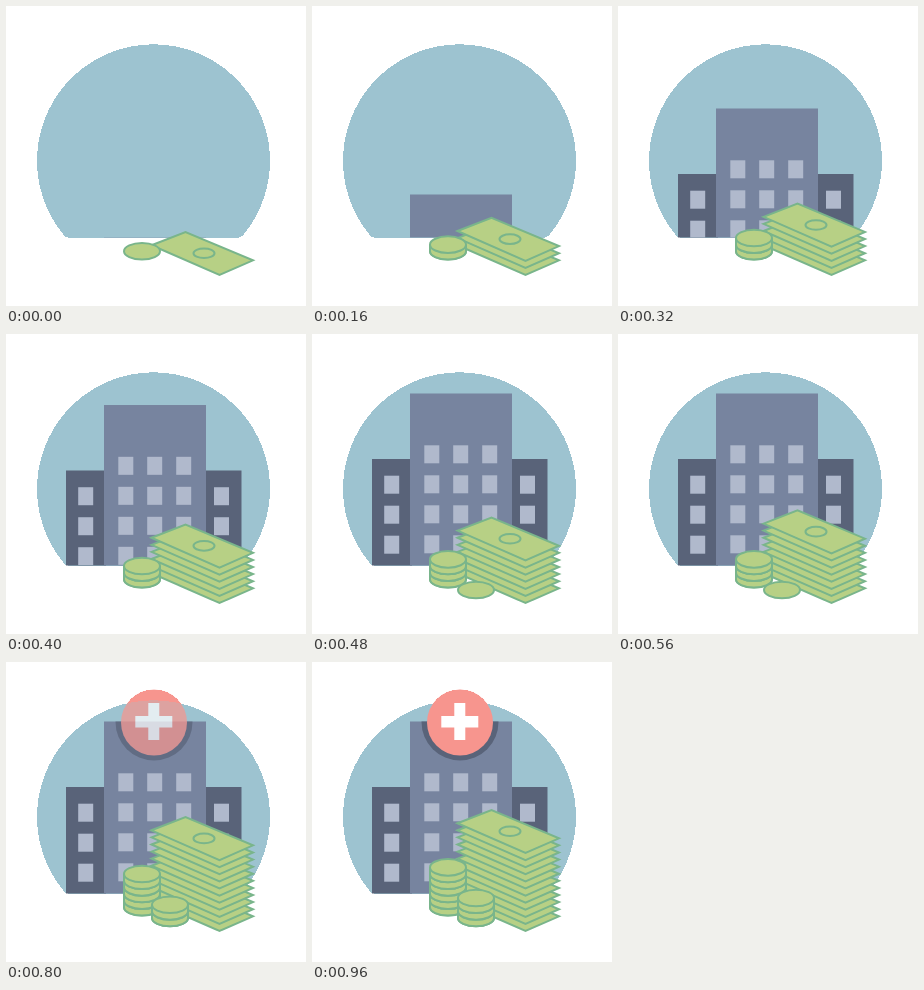
Animation of 300x300 px, one loop 2000 ms. Source, as an HTML page:

```html
<!DOCTYPE html>
<html lang="en">
<head>
<meta charset="utf-8">
<title>Hospital costs</title>
<style>
  html, body { margin: 0; width: 100%; height: 100%; overflow: hidden; background: #fff; }
  svg { display: block; width: 100vw; height: 100vh; }
  .crisp { shape-rendering: crispEdges; }
  .main { fill: #77849f; }
  .dark { fill: #596379; }
  .window { fill: #b0b9cc; }
  .red { fill: #f7958e; }
  .money { fill: #b7d085; stroke: #79b58b; stroke-width: 2; stroke-linejoin: miter; }
</style>
</head>
<body>
<svg viewBox="0 0 300 300">
  <defs>
    <clipPath id="ground"><rect width="300" height="231.5"/></clipPath>
    <clipPath id="facade"><rect x="98" y="59.5" width="102" height="172"/></clipPath>
  </defs>
  <circle id="halo" class="red crisp" cx="148" cy="60.5" r="33"/>
  <path class="crisp" fill="#9dc3d0"
    d="M62 231.5Q60 231.5 57.7 229A116.5 116.5 0 1 1 237.3 229Q235 231.5 233 231.5Z"/>
  <g clip-path="url(#ground)">
    <g id="building">
      <path class="dark" d="M60 125h40v107h-40zM198 125h37.5v107h-37.5z"/>
      <rect class="main" x="98" y="59.5" width="102" height="173"/>
    </g>
  </g>
  <g id="emblem">
    <circle class="dark" cx="148" cy="60" r="38.5" clip-path="url(#facade)"/>
    <circle class="red" cx="148" cy="60.5" r="33"/>
    <path fill="#fff" d="M142.3 41h11v13h13v11.5h-13v12.5h-11v-12.5h-13v-11.5h13z"/>
  </g>
  <g id="bills" class="money"></g>
  <g id="leftCoins" class="money"></g>
  <g id="rightCoins" class="money"></g>
</svg>
<script>
const LOOP = 2000, STEP = 40;
const BILL_GAP = 78 / 11, COIN_GAP = 6.65;
const el = id => document.getElementById(id);
const clamp = x => Math.min(1, Math.max(0, x));

function add(parent, tag, attrs) {
  const node = document.createElementNS('http://www.w3.org/2000/svg', tag);
  for (const key in attrs) node.setAttribute(key, attrs[key]);
  parent.appendChild(node);
  return node;
}

function addWindows(columns, rows, top) {
  for (const x of columns)
    for (let i = 0; i < rows; i++)
      add(el('building'), 'rect', { class: 'window', x, y: top + 30 * i, width: 15, height: 18 });
}

function addBills(count) {
  for (let i = 0; i < count; i++) {
    const bill = add(el('bills'), 'g', { transform: `translate(0 ${-i * BILL_GAP})` });
    add(bill, 'path', { d: 'M145.5 239.2L179.5 226L247 254.3L213.5 269Z' });
    add(bill, 'ellipse', { cx: 198, cy: 247.3, rx: 10.5, ry: 4.8 });
  }
}

function addCoins(id, x, y, count) {
  for (let i = 0; i < count; i++) {
    const coin = add(el(id), 'g', { transform: `translate(${x} ${y - i * COIN_GAP})` });
    if (i) add(coin, 'path', { d: `M-18 0v${COIN_GAP}a18 8.3 0 0 0 36 0v${-COIN_GAP}` });
    add(coin, 'ellipse', { rx: 18, ry: 8.3 });
  }
}

function showFirst(id, count) {
  [...el(id).children].forEach((node, i) => {
    node.style.display = i < count ? '' : 'none';
  });
}

addWindows([112.3, 141.2, 170.2], 4, 111.3);
addWindows([72.2, 208], 3, 141.7);
addBills(12);
addCoins('leftCoins', 136, 245.3, 7);
addCoins('rightCoins', 164, 256, 4);

function draw(now) {
  const t = Math.floor((now % LOOP) / STEP) * STEP;

  const rise = (1 - Math.cos(Math.PI * clamp(t / 480))) / 2;
  el('building').setAttribute('transform', `translate(0 ${172 * (1 - rise)})`);

  // Beyond the blue disc the badge has a hard edge instead of a fade.
  const fade = clamp((t - 600) / 280);
  el('emblem').setAttribute('opacity', fade);
  el('emblem').setAttribute('clip-path', fade < 0.5 ? 'url(#disc)' : 'none');
  el('halo').style.display = fade < 0.5 ? 'none' : '';

  showFirst('bills', 1 + Math.floor(t / 80));
  showFirst('leftCoins', 1 + Math.floor(t / 160));
  showFirst('rightCoins', Math.floor(t / 160) - 2);
}

const disc = add(document.querySelector('defs'), 'clipPath', { id: 'disc' });
add(disc, 'circle', { cx: 147.5, cy: 155, r: 116.5 });

function tick() {
  draw(performance.now());
  requestAnimationFrame(tick);
}
tick();
</script>
</body>
</html>
```
